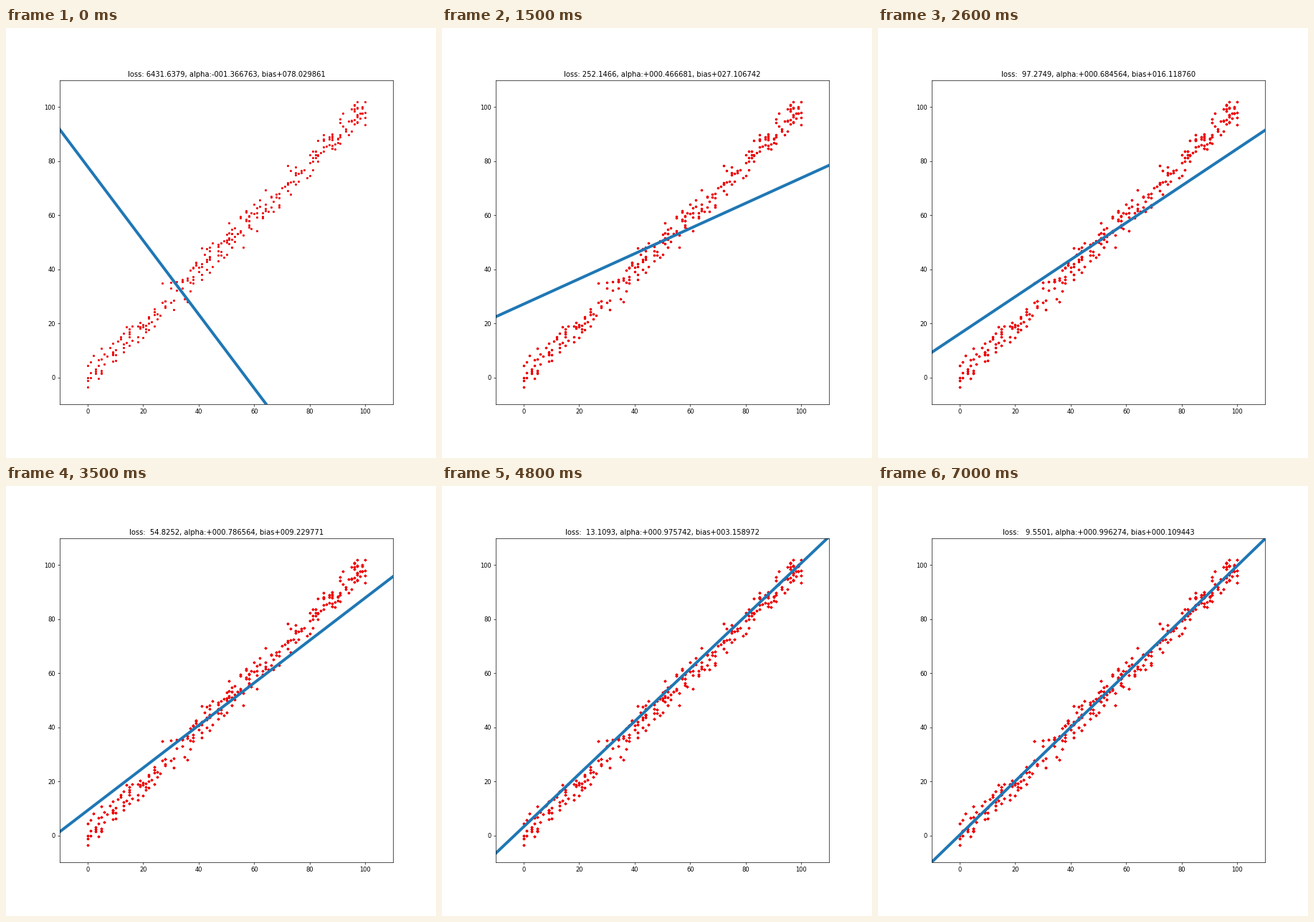
Recreate the animation shown at these times as a matplotlib script. Size 600x600 px, loop 7.1 s.

```python
import numpy as np
import matplotlib.pyplot as plt
from matplotlib.animation import FuncAnimation

FRAMES, INTERVAL = 71, 100
POINTS, NOISE = 300, 3.09

# Key states of the fit: step, alpha, bias, loss. The last one is held.
KEYS = np.array([
    (0, -1.366763, 78.029861, 6431.6379),
    (7, 0.367762, 46.239862, 537.2419),
    (15, 0.466681, 27.106742, 252.1466),
    (26, 0.684564, 16.118760, 97.2749),
    (35, 0.786564, 9.229771, 54.8252),
    (48, 0.975742, 3.158972, 13.1093),
    (64, 0.996274, 0.109443, 9.5501)])
STEP, ALPHA, BIAS, LOSS = KEYS.T
LAST = int(STEP[-1])
TILT = (1 - ALPHA) / BIAS

rng = np.random.default_rng(7)
px = rng.integers(0, 101, POINTS)
py = px + np.clip(rng.normal(0, NOISE, POINTS), -8, 8)


def mse(a, b):
    return np.mean((a * px + b - py) ** 2)


LOSS_SCALE = LOSS / [mse(a, b) for a, b in zip(ALPHA, BIAS)]


def fit_at(step):
    """Bias decays exponentially; after one step alpha follows it."""
    b = np.exp(np.interp(step, STEP, np.log(BIAS)))
    tilt = np.interp(step, STEP[1:], TILT[1:]) if step else TILT[0]
    a = 1 - tilt * b
    return a, b, mse(a, b) * np.interp(step, STEP, LOSS_SCALE)


fig, ax = plt.subplots(figsize=(10, 10), dpi=60)
fig.subplots_adjust(left=0.125, right=0.9, bottom=0.1245, top=0.879)
ax.set(xlim=(-10, 110), ylim=(-10, 110))
ax.set_xticks(range(0, 101, 20))
ax.set_yticks(range(0, 101, 20))

# The cloud is plotted again at every step, so its soft edges harden.
layers = [ax.plot(px, py, ".", color="#ee0004", ms=5.4)[0]
          for _ in range(LAST + 1)]
ends = np.array([-20, 120])
line, = ax.plot(ends, ends, color="C0", lw=4.8, zorder=2.2)
title = ax.set_title("")


def update(frame):
    step = min(frame, LAST)
    a, b, loss = fit_at(step)
    for i, layer in enumerate(layers):
        layer.set_visible(i <= step)
    line.set_ydata(a * ends + b)
    title.set_text(f"loss: {loss:8.4f}, alpha:{a:+011.6f}, bias{b:+011.6f}")
    return [*layers, line, title]


anim = FuncAnimation(fig, update, frames=FRAMES, interval=INTERVAL,
                     repeat=True, repeat_delay=0)
plt.show()
```
